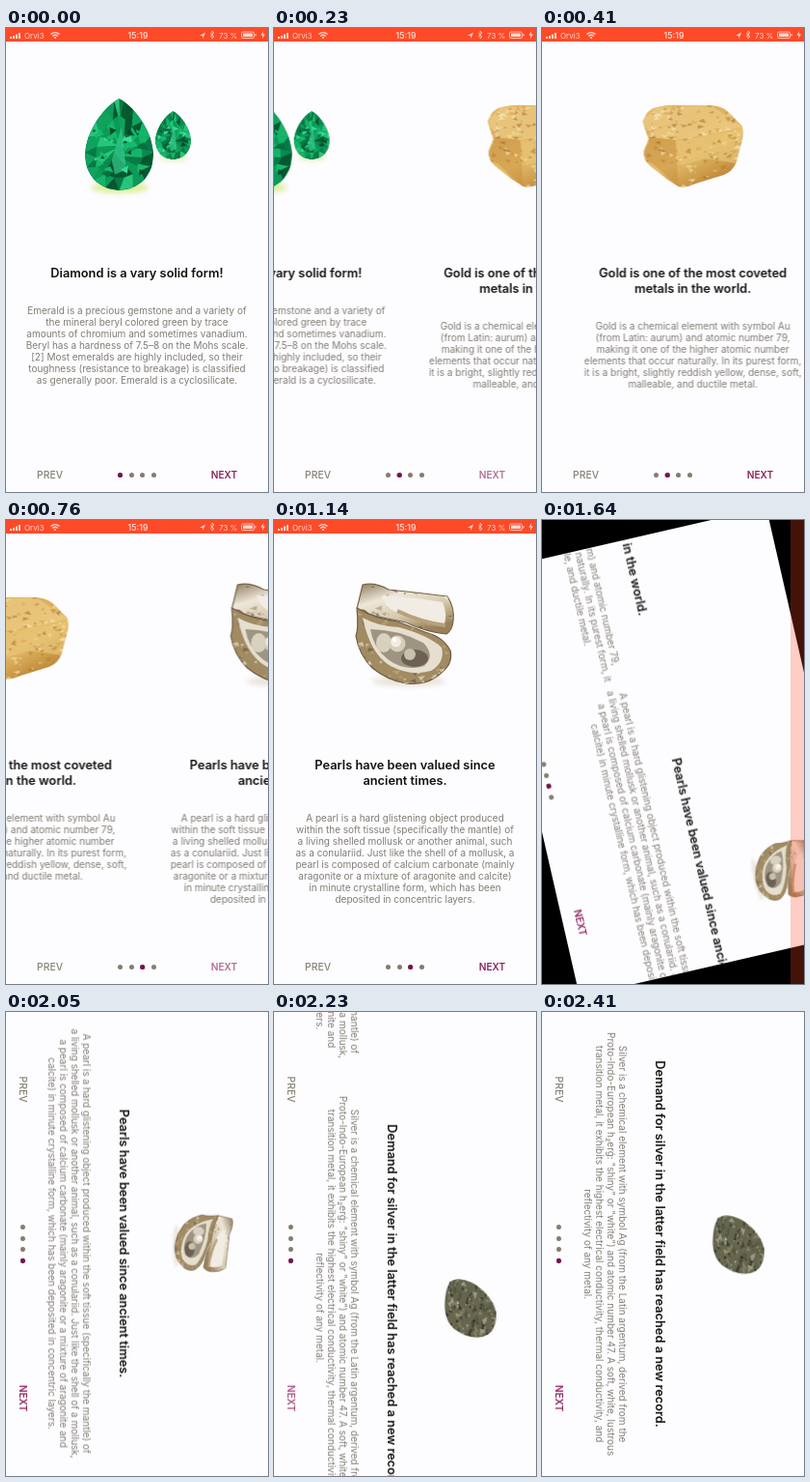
Animation, 272 px wide and 480 px high, one loop 2430 ms. Source, as an HTML page:

```html
<!DOCTYPE html>
<html lang="en">
<head>
<meta charset="utf-8">
<title>Gemstone onboarding</title>
<style>
html, body { margin: 0; width: 100%; height: 100%; overflow: hidden; background: #000; }
* { box-sizing: border-box; }
.stage { position: relative; width: 272px; height: 480px; overflow: hidden; isolation: isolate; background: #000;
  font-family: Inter, "Open Sans", sans-serif; }

/* One loop is 2430 ms; percentages are ms / 24.3 */
.view, .push, .pull, .track, .art, .tall, .wide, .nav, .next, .active, .bar, .strip {
  animation: 2430ms linear infinite both; }

.view { position: absolute; left: 50%; top: 50%; overflow: hidden; background: #fdfcfe; animation-name: turn; }
@keyframes turn {
  0% { width: 272px; height: 480px; transform: translate(-50%, -50%) rotate(0deg); }
  58.436% { width: 272px; height: 480px; transform: translate(-50%, -50%) rotate(0deg); animation-timing-function: ease-in-out; }
  70.782%, 100% { width: 480px; height: 272px; transform: translate(-50%, -50%) rotate(90deg); }
}

.push, .pull, .track { position: absolute; inset: 0; }
/* While turning, pages spread apart first and the scroll offset catches up */
.push { animation-name: push; }
@keyframes push {
  0% { transform: translateX(0); }
  58.436% { transform: translateX(0); animation-timing-function: ease-in-out; }
  70.782%, 100% { transform: translateX(416px); }
}
.pull { animation-name: pull; }
@keyframes pull {
  0% { transform: translateX(0); }
  60.905% { transform: translateX(0); animation-timing-function: ease-in-out; }
  74.074%, 100% { transform: translateX(-416px); }
}
.track { animation-name: scroll; }
@keyframes scroll {
  0% { transform: translateX(0); }
  4.28% { transform: translateX(0); animation-timing-function: cubic-bezier(.3, 0, .05, 1); }
  24.856% { transform: translateX(-100%); }
  26.379% { transform: translateX(-100%); animation-timing-function: cubic-bezier(.3, 0, .05, 1); }
  46.955% { transform: translateX(-200%); }
  84.156% { transform: translateX(-200%); animation-timing-function: cubic-bezier(.3, 0, .05, 1); }
  99.177%, 100% { transform: translateX(-300%); }
}

.page { position: absolute; top: 0; left: calc(var(--i) * 100%); width: 100%; height: 100%; }
.art { position: absolute; left: 50%; width: 120px; height: 120px; margin: -60px; overflow: visible;
  animation-name: art; animation-timing-function: step-end; }
@keyframes art {
  0% { top: 120px; transform: scale(1); }
  58.436%, 100% { top: 68px; transform: scale(.58); }
}

.text { position: absolute; left: 50%; transform: translateX(-50%); white-space: pre; text-align: center; }
.text h2 { margin: 0 0 24px; font-size: 12.8px; line-height: 16px; font-weight: 600; color: #14110f; }
.text p { margin: 0; font-size: 10px; line-height: 12px; color: #807d74; }
.tall { top: 246px; animation-name: tall; animation-timing-function: step-end; }
.wide { top: 142px; animation-name: wide; animation-timing-function: step-end; }
@keyframes tall { 0% { opacity: 1; } 58.436%, 100% { opacity: 0; } }
@keyframes wide { 0% { opacity: 0; } 58.436%, 100% { opacity: 1; } }

.nav { position: absolute; bottom: 10.5px; height: 14px; line-height: 14px; animation-name: nav; }
@keyframes nav {
  0% { left: 45.5px; right: 45.5px; }
  58.436% { left: 45.5px; right: 45.5px; animation-timing-function: ease-in-out; }
  70.782%, 100% { left: 80px; right: 80px; }
}
.prev, .next { position: absolute; top: 0; }
.prev { left: 0; transform: translateX(-50%); font-size: 10.4px; font-weight: 500; color: #878376; }
.next { right: 0; top: -.7px; transform: translateX(50%); font-size: 10.2px; font-weight: 600; color: #8d235f; animation-name: tap; }
@keyframes tap {
  0%, 4.1% { opacity: 1; }
  4.9% { opacity: .35; }
  15%, 25.6% { opacity: 1; }
  26.3% { opacity: .35; }
  37%, 84.4% { opacity: 1; }
  85.6% { opacity: .35; }
  95%, 100% { opacity: 1; }
}
.dots { position: absolute; left: 50%; top: 4.5px; width: 40px; height: 5px; margin-left: -20px; }
.dots i { position: absolute; left: calc(var(--i) * 11.6px); width: 5px; height: 5px; border-radius: 50%; background: #857c70; }
.dots .active { left: 0; background: #760f50; animation-name: active; animation-timing-function: step-end; }
@keyframes active {
  0% { transform: translateX(0); }
  4.28% { transform: translateX(11.6px); }
  26.3% { transform: translateX(23.2px); }
  84.156%, 100% { transform: translateX(34.8px); }
}

.bar { position: absolute; left: 0; top: 0; width: 272px; height: 14px; background: #fd4a28;
  animation-name: tall; animation-timing-function: step-end; }
.bar svg { display: block; }
.strip { position: absolute; right: 0; top: 0; width: 14px; height: 100%; background: #fd4a28; animation-name: strip; }
@keyframes strip {
  0%, 58.43% { opacity: 0; }
  58.436% { opacity: 1; }
  70.782%, 100% { opacity: 0; }
}
</style>
</head>
<body>
<div class="stage">
  <div class="view">
    <div class="push"><div class="pull"><div class="track">
      <section class="page" style="--i:0">
        <svg class="art" id="emerald" viewBox="76 60 120 120"></svg>
        <div class="text tall"><h2>Diamond is a vary solid form!</h2><p>Emerald is a precious gemstone and a variety of
the mineral beryl colored green by trace
amounts of chromium and sometimes vanadium.
Beryl has a hardness of 7.5–8 on the Mohs scale.
[2] Most emeralds are highly included, so their
toughness (resistance to breakage) is classified
as generally poor. Emerald is a cyclosilicate.</p></div>
      </section>
      <section class="page" style="--i:1">
        <svg class="art" id="gold" viewBox="76 60 120 120"></svg>
        <div class="text tall"><h2>Gold is one of the most coveted
metals in the world.</h2><p>Gold is a chemical element with symbol Au
(from Latin: aurum) and atomic number 79,
making it one of the higher atomic number
elements that occur naturally. In its purest form,
it is a bright, slightly reddish yellow, dense, soft,
malleable, and ductile metal.</p></div>
        <div class="text wide"><h2>Gold is one of the most coveted metals in the world.</h2><p>Gold is a chemical element with symbol Au (from Latin: aurum) and atomic number 79,
making it one of the higher atomic number elements that occur naturally. In its purest form, it
is a bright, slightly reddish yellow, dense, soft, malleable, and ductile metal.</p></div>
      </section>
      <section class="page" style="--i:2">
        <svg class="art" id="pearl" viewBox="76 60 120 120"></svg>
        <div class="text tall"><h2>Pearls have been valued since
ancient times.</h2><p>A pearl is a hard glistening object produced
within the soft tissue (specifically the mantle) of
a living shelled mollusk or another animal, such
as a conulariid. Just like the shell of a mollusk, a
pearl is composed of calcium carbonate (mainly
aragonite or a mixture of aragonite and calcite)
in minute crystalline form, which has been
deposited in concentric layers.</p></div>
        <div class="text wide"><h2>Pearls have been valued since ancient times.</h2><p>A pearl is a hard glistening object produced within the soft tissue (specifically the mantle) of
a living shelled mollusk or another animal, such as a conulariid. Just like the shell of a mollusk,
a pearl is composed of calcium carbonate (mainly aragonite or a mixture of aragonite and
calcite) in minute crystalline form, which has been deposited in concentric layers.</p></div>
      </section>
      <section class="page" style="--i:3">
        <svg class="art" id="silver" viewBox="-60 -60 120 120"></svg>
        <div class="text wide"><h2>Demand for silver in the latter field has reached a new record.</h2><p>Silver is a chemical element with symbol Ag (from the Latin argentum, derived from the
Proto-Indo-European h₂erǵ: "shiny" or "white") and atomic number 47. A soft, white, lustrous
transition metal, it exhibits the highest electrical conductivity, thermal conductivity, and
reflectivity of any metal.</p></div>
      </section>
    </div></div></div>
    <div class="nav">
      <span class="prev">PREV</span>
      <span class="dots"><i style="--i:0"></i><i style="--i:1"></i><i style="--i:2"></i><i style="--i:3"></i><i class="active"></i></span>
      <span class="next">NEXT</span>
    </div>
  </div>
  <div class="strip"></div>
  <div class="bar">
    <svg width="272" height="14" fill="#ffd9d0" font-family="Inter, sans-serif" font-size="8">
      <path d="M4 9h2v2h-2zM7 8h2v3h-2zM10 6.5h2v4.5h-2zM13 5h2v6h-2z"/>
      <text x="19" y="10.6">Orvi3</text>
      <g fill="none" stroke="#ffd9d0" stroke-width="1.3">
        <path d="M46.5 6.6q4.5-4 9 0M48.3 8.5q2.7-2.4 5.4 0"/>
        <rect x="244.5" y="4" width="13" height="6.5" rx="1.5" stroke-width=".8"/>
      </g>
      <circle cx="51" cy="10" r="1.1"/>
      <text x="137" y="10.8" text-anchor="middle" font-size="8.6" font-weight="600">15:19</text>
      <path d="M201 8l6-3.5-2.6 6.5-.4-3z"/>
      <path d="M212 5.2l4 3.8-2 2v-8l2 2-4 3.8" fill="none" stroke="#ffd9d0" stroke-width=".8"/>
      <text x="221" y="10.6">73 %</text>
      <path d="M246 5.5h10v3.5h-10zM258.5 6h1v2.5h-1zM267.5 3l-3 4.6h2.2l-.8 3.6 3-4.8h-2.2z"/>
    </svg>
  </div>
</div>
<script>
const byId = id => document.getElementById(id);
const poly = (pts, fill) => `<polygon points="${pts.map(p => p.map(n => n.toFixed(1))).join(' ')}" fill="${fill}"/>`;

function random(seed) {
  return () => (seed = seed * 16807 % 2147483647) / 2147483647;
}

// Small triangles scattered over a box
function shards(count, [x, y, w, h], size, colors, seed) {
  const rnd = random(seed);
  let out = '';
  for (let i = 0; i < count; i++) {
    const cx = x + rnd() * w, cy = y + rnd() * h, a = rnd() * 6.3, r = size * (.4 + rnd());
    const pts = [0, 1.7, 3.6].map(k => [cx + r * Math.cos(a + k), cy + r * .7 * Math.sin(a + k)]);
    out += poly(pts, colors[Math.floor(rnd() * colors.length)]);
  }
  return out;
}

const clipped = (id, shape, inner) => `<clipPath id="${id}">${shape}</clipPath><g clip-path="url(#${id})">${inner}</g>`;
const glow = (cx, cy, rx, ry, color) =>
  `<ellipse cx="${cx}" cy="${cy}" rx="${rx}" ry="${ry}" fill="${color}" style="filter:blur(2.5px)"/>`;

// Pear-cut stone: outer girdle, crown ring and table
function pear(id, cx, cy, rx, ry, seed) {
  const rnd = random(seed), steps = 18;
  const at = (k, s) => {
    const t = ((k / steps) % 1 + 1) % 1 * 2 * Math.PI;
    return [cx + s * rx * 1.19 * Math.sin(t) * Math.sin(t / 2) ** .6,
            cy + ry * (.16 + s * (-Math.cos(t) - .16))];
  };
  const ring = (n, s) => Array.from({ length: n }, (_, i) => at(i * steps / n, s));
  const greens = ['#087a45', '#0d9a58', '#14b56a', '#0a8a4e', '#27c57c', '#06572f', '#0fa35e'];
  const pick = () => greens[Math.floor(rnd() * greens.length)];
  let inner = poly(ring(72, 1), '#0a8a4e');
  for (let k = 0; k < steps; k++) {
    inner += poly([at(k, 1), at(k + 1, 1), at(k + .5, .68)], pick());
    inner += poly([at(k - .5, .68), at(k + .5, .68), at(k, 1)], pick());
    inner += poly([at(k - .5, .68), at(k + .5, .68), at(k + 3, .12)], pick());
  }
  inner += shards(26, [cx - rx * .75, cy - ry * .35, rx * 1.5, ry], rx * .17, ['#064a28', '#3ddb96', '#0a7040', '#18b86c'], seed + 5);
  inner += poly([at(1, .5), at(8, .5), at(9.5, .6), at(11, .3)], '#38d292aa');
  return clipped(id, poly(ring(72, 1), '#000'), inner);
}

byId('emerald').innerHTML =
  glow(118, 165, 30, 6, '#dfeea0') + glow(174, 134, 15, 3, '#e4f1b4') +
  pear('cutA', 117.5, 120.5, 35.5, 47.5, 41) + pear('cutB', 173.5, 111, 18.5, 25, 97);

const gradient = (id, stops) => `<linearGradient id="${id}" x1="0" y1="0" x2=".6" y2="1">${
  stops.map((c, i) => `<stop offset="${i / (stops.length - 1)}" stop-color="${c}"/>`).join('')}</linearGradient>`;

const nugget = '<path d="M84 97Q88 84 98 82Q110 79 123 80L155 80Q166 81 172 86L187 101Q190 110 186 120L181 139Q178 148 168 152L139 161Q127 166 121 164L110 157L92 143Q84 136 85 127L90 115Z" fill="url(#goldFill)"/>';
byId('gold').innerHTML = gradient('goldFill', ['#e3bd6c', '#dcae5e', '#e5bd6a', '#bd8838']) + nugget +
  clipped('goldClip', nugget,
    '<path d="M84 97L98 82L155 80L187 102L165 108L118 116L92 113Z" fill="#efd08a" opacity=".6"/>' +
    '<path d="M92 113L118 116L121 164L85 132Z" fill="#c48c3c" opacity=".45"/>' +
    '<path d="M118 117L152 111L188 105L181 140L150 135L124 142Z" fill="#e9c578" opacity=".7"/>' +
    shards(190, [84, 78, 106, 86], 3.2, ['#f7e2a299', '#b47a2d88', '#d9a24c99', '#94622577', '#fbefcc88'], 23));

const lid = '<path d="M92 67Q105 64 119 72Q148 75 180 79Q188 91 186 105Q185 114 179 118Q158 116 137 106L99 98Q93 91 89 94Q85 92 88 84Z" fill="url(#lidFill)" stroke="#75634a" stroke-width="1.2"/>';
const cup = '<path d="M86 91Q88 112 85 120Q88 139 102 153Q118 166 137 169Q160 172 175 157Q186 148 183 135Q176 121 157 116L128 105Q105 102 86 91Z" fill="#a18b63" stroke="#6e5b46" stroke-width="1.2"/>';
byId('pearl').innerHTML = gradient('lidFill', ['#8d7a5c', '#eee6d8', '#d6c9ae', '#9a815a']) +
  glow(140, 167, 38, 5, '#e8e2d8') + lid +
  clipped('lidClip', lid,
    shards(55, [86, 65, 100, 52], 3.5, ['#fff8ee77', '#8f774f77', '#cdbb9166', '#51434288'], 31) +
    '<path d="M112 78Q148 80 175 85Q181 98 176 110Q150 103 126 95Q113 89 112 78Z" fill="#f1ece4"/>' +
    '<path d="M128 94Q153 106 178 109" fill="none" stroke="#b6a27c" stroke-width="4"/>') +
  cup + clipped('cupClip', cup,
    shards(100, [84, 92, 100, 77], 3.5, ['#eee0c4aa', '#5d4a4088', '#c8ae7e99', '#faf3e6aa'], 77) +
    '<path d="M92 101Q108 110 130 111Q162 120 174 132Q178 147 163 156Q142 162 121 151Q100 139 92 101Z" fill="#e6dfd0"/>' +
    '<path d="M100 113Q128 113 155 127Q168 140 156 151Q135 157 118 144Q103 132 100 113Z" fill="#9f9481"/>' +
    '<ellipse cx="146" cy="143" rx="14" ry="9" fill="#6c6154"/><ellipse cx="114" cy="127" rx="8" ry="10" fill="#d9d1bf"/>' +
    '<circle cx="141" cy="139" r="6" fill="#c9c0ae"/>') +
  '<circle cx="128" cy="128" r="8.5" fill="#d6cdba"/><circle cx="126.5" cy="126" r="5.5" fill="#f2ece0"/><circle cx="125" cy="124" r="2.2" fill="#fff"/>';

const rock = '<path d="M-46 37Q-53 25-50 14Q-47-2-38-13Q-29-26-17-34Q0-46 14-46Q33-45 43-37Q53-26 53-13Q53 3 46 16Q39 31 26 39Q10 47-7 46Q-32 45-46 37Z" fill="#66664f"/>';
byId('silver').innerHTML = rock + clipped('rockClip', rock,
  shards(170, [-54, -46, 108, 92], 6, ['#3d3e31', '#828168', '#55573f', '#9d9a80', '#6e7160', '#494735'], 19) +
  shards(42, [-48, -42, 96, 82], 3, ['#c9c5ad', '#2c2d24', '#a88f4d'], 88));
</script>
</body>
</html>
```
